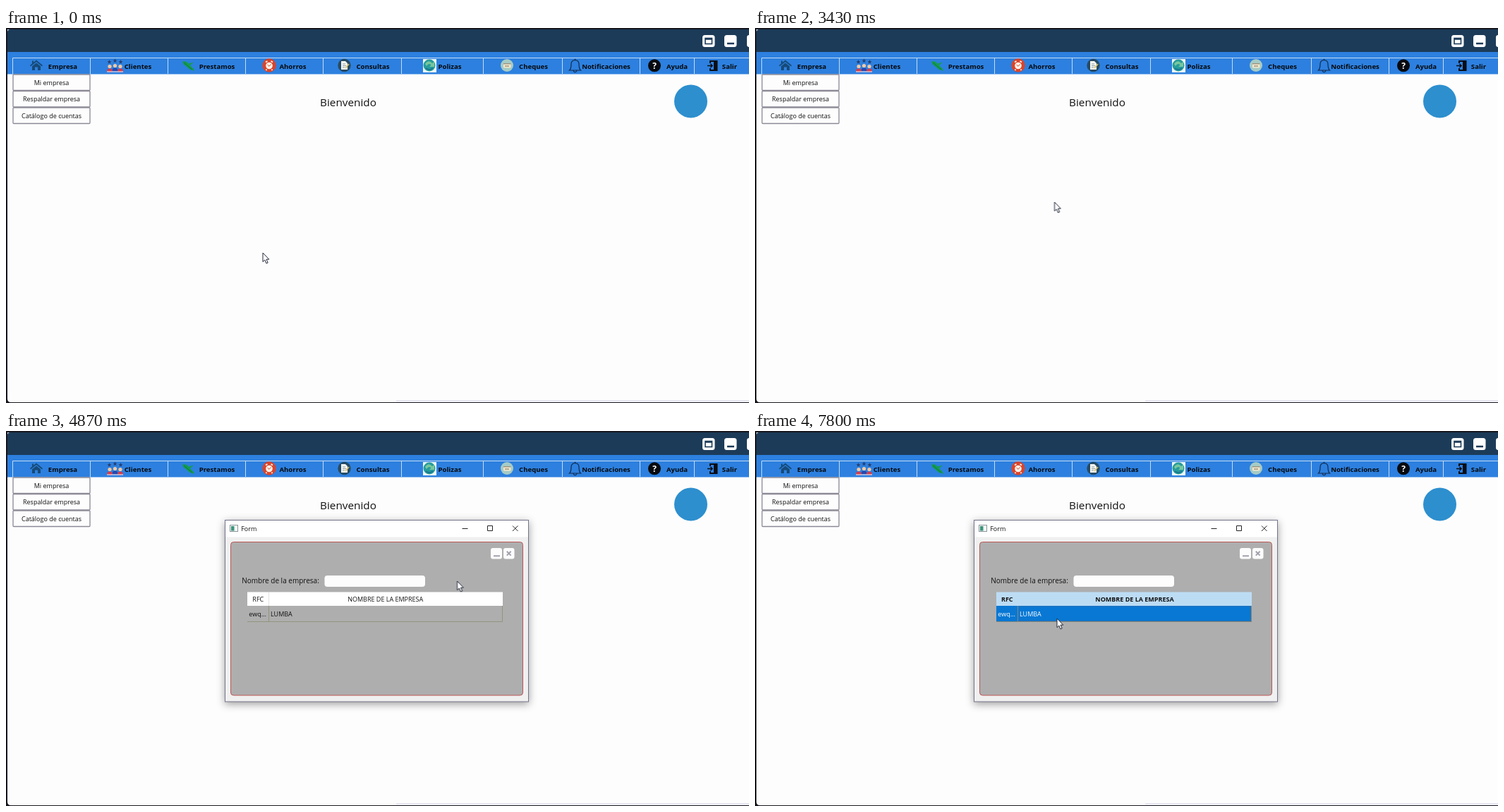
An HTML page that plays this animation: 1053 by 532 pixels, repeating every 8000 ms.

```html
<!DOCTYPE html>
<html lang="es">
<head>
<meta charset="utf-8">
<title>Bienvenido</title>
<style>
  html, body { margin: 0; width: 100%; height: 100%; overflow: hidden; background: #fdfdfd; }
  svg { display: block; width: 1053px; height: 532px; }
  text { font: 9px "Open Sans", "Noto Sans", sans-serif; fill: #111; text-anchor: middle; }
  .menu text { font-size: 9.6px; font-weight: 700; fill: #06080c; }
  .left text, text.left { text-anchor: start; }
  .bold text { font-weight: 700; }
  .white text { fill: #fff; }

  #dialog, #cursor, #picked, #plain { animation: 8s linear infinite; }
  #dialog { transform-origin: 525px 255px; animation-name: open; animation-timing-function: step-end; }
  #cursor { animation-name: move; }
  #picked { animation-name: pick; animation-timing-function: step-end; }
  #plain { animation-name: unpick; animation-timing-function: step-end; }
  .frame { filter: drop-shadow(0 3px 6px rgba(0, 0, 0, .38)); }

  @keyframes open {
    0%      { opacity: 0; transform: scale(.92); }
    51.25%  { opacity: .3; transform: scale(.94); }
    52.08%  { opacity: .65; transform: scale(.975); }
    52.85%  { opacity: .9; transform: scale(.995); }
    55%, 100% { opacity: 1; transform: none; }
  }
  @keyframes pick { 0% { opacity: 0; } 78.7%, 100% { opacity: 1; } }
  @keyframes unpick { 0% { opacity: 1; } 78.7%, 100% { opacity: 0; } }
  @keyframes move {
    0%, 1.5%        { transform: translate(364px, 319px); }
    5.4%, 7%        { transform: translate(336px, 290px); animation-timing-function: ease-in-out; }
    14.5%, 17.6%    { transform: translate(82px, 78px); animation-timing-function: ease-in-out; }
    23.7%, 55%      { transform: translate(424.5px, 247px); animation-timing-function: ease-in-out; }
    60.8%, 61.6%    { transform: translate(639.5px, 213px); }
    65%, 65.8%      { transform: translate(590px, 216px); }
    70%, 72%        { transform: translate(520px, 225px); animation-timing-function: ease-out; }
    77.5%, 100%     { transform: translate(428px, 266px); }
  }
</style>
</head>
<body>
<svg viewBox="0 0 1053 532">
  <defs>
    <g id="person">
      <circle r="2.6" fill="#f3c9a5"/>
      <path d="M-3.6 8V5.5Q-3.6 3 0 3T3.6 5.5V8Z"/>
    </g>
    <path id="star" d="M0-3L.9-1H3L1.3.5 2 2.8 0 1.5-2 2.8-1.3.5-3-1H-.9Z" fill="#263f73"/>
  </defs>

  <!-- application window -->
  <rect width="1053" height="532" fill="#17171f"/>
  <path d="M2 2H1053V531H7Q2 531 2 526Z" fill="#fdfdfd"/>
  <path d="M2 34V6Q2 2 6 2H1053V34Z" fill="#1c3b58"/>
  <rect x="2" y="34" width="1051" height="31.5" fill="#2d80df"/>
  <rect x="553" y="528" width="500" height="2.5" fill="#e6e5f1"/>

  <g fill="#fff">
    <rect x="987" y="10" width="17.5" height="17" rx="3.5"/>
    <rect x="1018" y="10" width="17.5" height="17" rx="3.5"/>
    <rect x="1050" y="10" width="17" height="17" rx="3.5"/>
  </g>
  <g fill="none" stroke="#1c3b58">
    <rect x="991" y="14.5" width="9.5" height="8" stroke-width="1.6"/>
    <path d="M991 15.5H1000.5M1022 22H1032" stroke-width="2.4"/>
  </g>

  <path d="M9.5 65V42.5H1053M119.5 42V65M229.5 42V65M339.5 42V65M449.5 42V65M560.5 42V65M676.5 42V65M788.5 42V65M898.5 42V65M975.5 42V65"
        fill="none" stroke="#c3dcf6"/>

  <g class="menu">
    <text x="80.5" y="57.5">Empresa</text>
    <text x="187" y="57.5">Clientes</text>
    <text x="299" y="57.5">Prestamos</text>
    <text x="406.5" y="57.5">Ahorros</text>
    <text x="520" y="57.5">Consultas</text>
    <text x="629" y="57.5">Polizas</text>
    <text x="747.5" y="57.5">Cheques</text>
    <text x="850.5" y="57.5">Notificaciones</text>
    <text x="951" y="57.5">Ayuda</text>
    <text x="1025.5" y="57.5">Salir</text>
  </g>

  <!-- menu icons -->
  <path d="M43 45.5L52 53 51 54.5 43 48 35 54.5 34 53 37 50.5V46.5H39V48.8ZM43 49.5L49 54.3V60H45V55.5H41V60H37V54.3Z" fill="#164a78"/>
  <g>
    <use href="#star" x="146.5" y="48"/><use href="#star" x="154.5" y="46.5"/><use href="#star" x="162.5" y="48"/>
    <use href="#person" x="147" y="54.5" fill="#d83b48"/>
    <use href="#person" x="162" y="54.5" fill="#d83b48"/>
    <use href="#person" x="154.5" y="53.5" fill="#2948ad"/>
    <path d="M143 62H166" stroke="#e9e1ed" stroke-width="1.2"/>
  </g>
  <path d="M250 47.5Q256 46 258.5 50.5L266 48.5 261 53 266 58 267 61 260 58.5 256 55 251.5 51.5Z" fill="#159b52"/>
  <path d="M252 49L264 59" stroke="#0c7b45"/>
  <circle cx="373" cy="53" r="9.7" fill="#d9442c"/>
  <circle cx="373" cy="53.5" r="4.8" fill="#fff2e8"/>
  <path d="M368 48.5L370.5 47M375.5 47L378 48.5M369.5 58.5L368.5 60M376.5 58.5L377.5 60" stroke="#fff2e8" stroke-width="1.8"/>
  <path d="M370.5 52L373 54.3 375.5 51.5" fill="none" stroke="#d9442c"/>
  <circle cx="479.5" cy="53" r="9.2" fill="#254a64"/>
  <path d="M475 47H481L484 50V59H475Z" fill="#f4f5ef"/>
  <path d="M477 51H481M477 53.5H482M477 56H480" stroke="#718697" stroke-width=".8"/>
  <path d="M481 57L486 51" stroke="#d9c36b" stroke-width="1.7"/>
  <rect x="591" y="44" width="19" height="19" fill="#eef7f5"/>
  <circle cx="600" cy="53" r="8.5" fill="#269c9c"/>
  <path d="M594 51Q599 44 604 50L607 48V55H600L602.5 52.5Q599 49 596 54Z" fill="#79c79d"/>
  <path d="M595 57Q600 61 605 57" fill="none" stroke="#176f8d" stroke-width="1.5"/>
  <circle cx="710" cy="53" r="9" fill="#a5cbc6"/>
  <rect x="705" y="50" width="10.5" height="6.5" rx="1" fill="#f3e8cc"/>
  <path d="M705 50.8H715.5M707 54H713" stroke="#756d60"/>
  <path d="M798.5 60Q801 58 801 51Q801 46 806.5 45.5Q812 46 812 51Q812 58 814.5 60ZM804 60.5Q806.5 65 809 60.5M806.5 45V43.8"
        fill="none" stroke="#102b50" stroke-width="1.2"/>
  <circle cx="919" cy="53.3" r="9" fill="#070a0f"/>
  <text x="919" y="57.8" style="font-size:12px;font-weight:700;fill:#fff">?</text>
  <path d="M997 46H1008.5V61H997V57H999V59H1003V48H999V50H997Z" fill="#080d15"/>
  <path d="M1003 48L1008 46V61L1003 59Z" fill="#080d15"/>
  <path d="M994 53.5H1001M998.5 51L1001 53.5 998.5 56" fill="none" stroke="#080d15" stroke-width="1.6"/>

  <!-- drop-down -->
  <g fill="#fdfdfd" stroke="#8d8996" stroke-width="1.3">
    <rect x="10" y="66" width="109" height="22.5" rx="1"/>
    <rect x="10" y="89.5" width="109" height="22.5" rx="1"/>
    <rect x="10" y="113" width="109" height="22.5" rx="1"/>
  </g>
  <text x="64.5" y="80.5">Mi empresa</text>
  <text x="64.5" y="104">Respaldar empresa</text>
  <text x="64.5" y="127.5">Catálogo de cuentas</text>

  <text x="485" y="111" style="font-size:15.3px">Bienvenido</text>
  <circle cx="970.5" cy="104" r="23.5" fill="#2d8fce"/>

  <!-- form window -->
  <g id="dialog">
    <rect class="frame" x="310.5" y="126.5" width="430" height="257.5" fill="#f0f0f0" stroke="#73738a"/>
    <rect x="311" y="127" width="429" height="23.5" fill="#fff"/>
    <rect x="317.5" y="133.5" width="11" height="9" fill="#f4f6f6" stroke="#8b969c"/>
    <rect x="319" y="135" width="4.5" height="6.5" fill="#3d947d"/>
    <text x="344.3" y="142">Form</text>
    <path d="M646.5 138.5H654.5M682.5 134.5H689.5V141.5H682.5ZM718 134.5L725.5 142M725.5 134.5L718 142" fill="none" stroke="#222"/>
    <rect x="318.5" y="157.5" width="414" height="217.5" rx="4" fill="#aeaeae" stroke="#bd5653"/>
    <rect x="687" y="166" width="16" height="15.5" rx="3" fill="#fcfcfc"/>
    <rect x="705" y="166" width="15.5" height="15.5" rx="3" fill="#fcfcfc"/>
    <path d="M691 177.2H700M709.8 170.8L715.6 176.6M715.6 170.8L709.8 176.6" stroke="#a2a2ae" stroke-width="2"/>
    <text x="389" y="215.5" style="font-size:10px">Nombre de la empresa:</text>
    <rect x="451.5" y="205" width="142.5" height="16" rx="4" fill="#fdfdfd"/>

    <g id="plain">
      <rect x="342" y="228.5" width="362" height="19.5" fill="#fff"/>
      <path d="M372.5 229V248" stroke="#e3e3e3"/>
      <path d="M342 270.5H703.5V248M372.5 248V270" fill="none" stroke="#94947f"/>
      <text x="357.3" y="242">RFC</text>
      <text x="537.7" y="242">NOMBRE DE LA EMPRESA</text>
      <g class="left">
        <text x="344.3" y="262.5">ewq...</text>
        <text x="375" y="262.5">LUMBA</text>
      </g>
    </g>
    <g id="picked">
      <rect x="342" y="228.5" width="362" height="19.5" fill="#bcdcf4"/>
      <rect x="342" y="248" width="362" height="22.5" fill="#0878d4"/>
      <path d="M342 270.5H703.5V248M372.5 248V270" fill="none" stroke="#858878"/>
      <rect x="374" y="249" width="328.5" height="20.5" fill="none" stroke="#2f6fae" stroke-width=".8"/>
      <g class="bold">
        <text x="357.3" y="242">RFC</text>
        <text x="538" y="242">NOMBRE DE LA EMPRESA</text>
      </g>
      <g class="left white">
        <text x="344.3" y="262.5">ewq...</text>
        <text x="375" y="262.5">LUMBA</text>
      </g>
    </g>
  </g>

  <path id="cursor" d="M0 0V12.7L2.8 10 5 15 7.2 14 5 9.2H8.8Z" fill="#fff" stroke="#222838" stroke-width="1"/>
</svg>
</body>
</html>
```
